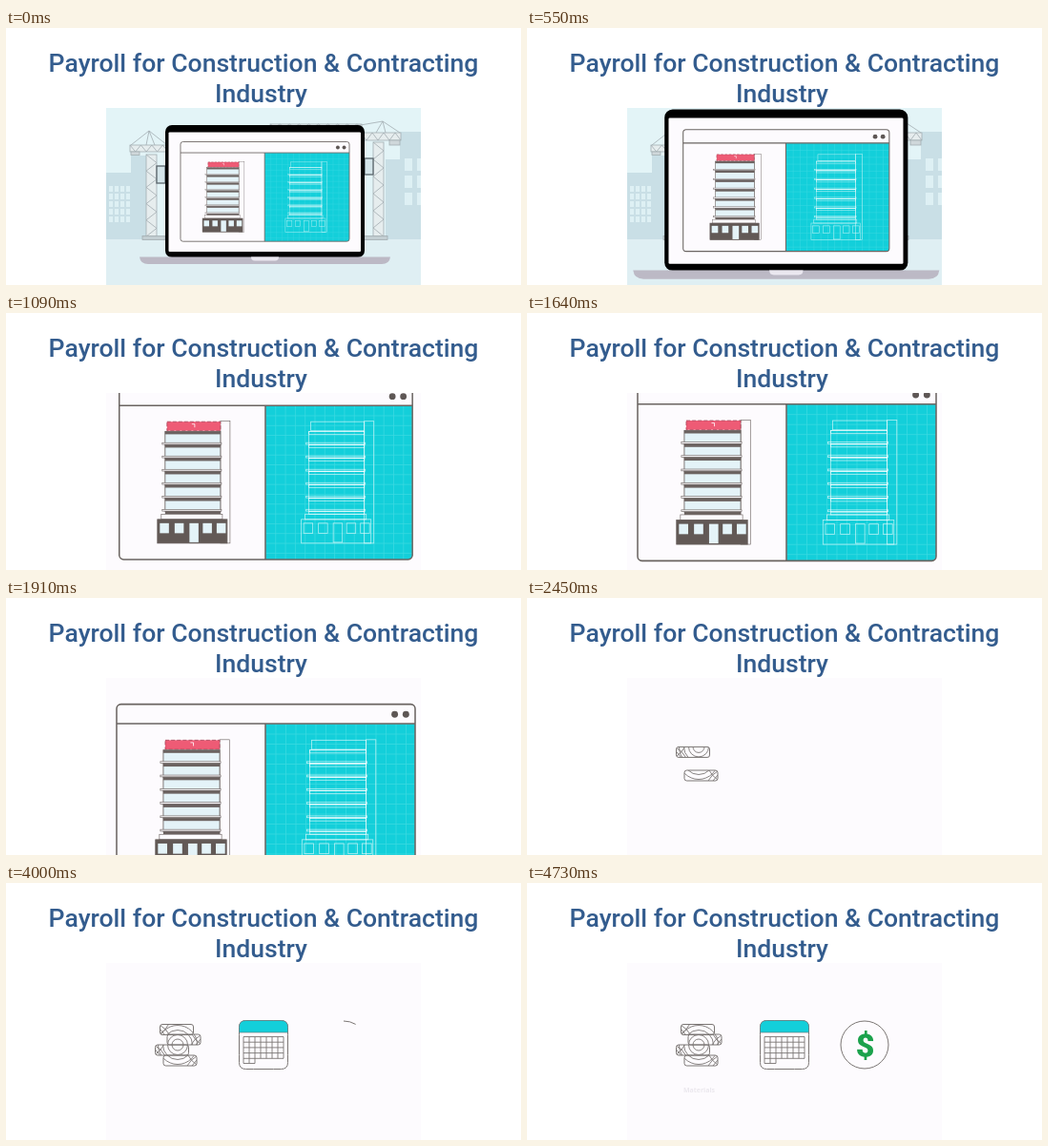
An HTML page that plays this animation: 540 by 270 pixels, repeating every 4.82 s.

```html
<!DOCTYPE html>
<html lang="en">
<head>
<meta charset="utf-8">
<title>Payroll for Construction</title>
<style>
  html, body { margin: 0; width: 100%; height: 100%; overflow: hidden; background: #fff; }
  svg { display: block; width: 540px; height: 270px; }
  .title { font: 500 26.55px Roboto, sans-serif; fill: #335c8e; text-anchor: middle; }
  .label { font: 700 7px "Open Sans", sans-serif; fill: #ebe8ee; text-anchor: middle; }
  .dollar { font: 900 34px Roboto, sans-serif; fill: #1ba24c; text-anchor: middle; }
  .line { fill: none; stroke: #7b7674; stroke-width: 1; }
  .crane { fill: none; stroke: #a2adb1; stroke-width: .8; }
  .solid { stroke: #665d5a; stroke-width: .8; fill: #fdfbfe; }
  .solid .roof { fill: #ee5b75; stroke: #a8475a; stroke-dasharray: 4 2; }
  .solid .glass { fill: #e4f3f8; }
  .solid .slab { fill: #6b6260; stroke: none; }
  .solid .edge { fill: #fdfbfe; stroke-width: .6; }
  .solid .base { fill: #625956; }
  .solid .pane { fill: #e4f3f8; stroke: none; }
  .plan { fill: none; stroke: #fff; stroke-width: .8; stroke-opacity: .66; }
  .plan .mark { display: none; }
</style>
</head>
<body>
<svg viewBox="0 0 540 270">
  <defs>
    <clipPath id="stage"><rect x="105" y="84" width="330" height="186"/></clipPath>
    <clipPath id="frame"><rect x="119" y="77" width="307" height="181.5" rx="4.5"/></clipPath>
    <pattern id="grid" x="272" y="97" width="10.3" height="10.3" patternUnits="userSpaceOnUse">
      <rect width="10.3" height="10.3" fill="#13cfda"/>
      <path d="M0 .4H10.3M.4 0V10.3" stroke="#3ad9e2" stroke-width=".8"/>
    </pattern>
  </defs>
  <text class="title" x="270" y="46">Payroll for Construction &amp; Contracting</text>
  <text class="title" x="267.5" y="78">Industry</text>
  <g clip-path="url(#stage)">
    <rect x="105" y="84" width="330" height="186" fill="#fdfbfe"/>
    <g id="city">
      <rect x="105" y="84" width="330" height="186" fill="#e3f4f7"/>
      <rect x="105" y="222" width="330" height="48" fill="#dfeff3"/>
    </g>
    <g id="laptop">
      <rect x="167" y="102" width="209" height="139" rx="7"/>
      <rect x="170.5" y="109.5" width="201.5" height="125.5" rx="1" fill="#fdfbfe"/>
      <path d="M140 240.5H403Q402 248 394 248H149Q141 248 140 240.5Z" fill="#bcb9c5"/>
      <path d="M257 240.5H286Q286 244.5 282 244.5H261Q257 244.5 257 240.5Z" fill="#ebe8f0"/>
      <g id="win">
        <g clip-path="url(#frame)">
          <rect x="119" y="77" width="307" height="182" fill="#fdfbfe"/>
          <rect x="272" y="97" width="154" height="162" fill="url(#grid)"/>
        </g>
        <g fill="none" stroke="#6a6461" stroke-width="1.5">
          <rect x="119" y="77" width="307" height="181.5" rx="4.5"/>
          <path d="M119 97H426M272 97V258.5"/>
        </g>
        <g fill="#5e5755"><circle cx="405" cy="87.5" r="3.4"/><circle cx="416.5" cy="87.5" r="3.4"/></g>
        <g id="built" class="solid"></g>
        <g id="drawn" class="plan" transform="translate(150.6 0)"></g>
      </g>
    </g>
    <g id="planks"></g>
    <g id="calendar">
      <path id="sheet" class="line"/>
      <path id="head" fill="#13cfda" stroke="#6f7d80" stroke-width=".7"/>
      <path id="cells" class="line" style="stroke-width:.9"/>
    </g>
    <circle id="coin" class="line" cx="354" cy="170" r="25" pathLength="1" stroke-dasharray="1 2" transform="rotate(-90 354 170)"/>
    <text id="dollar" class="dollar" y="12.2">$</text>
    <text id="label" class="label" x="180.5" y="219.5">Materials</text>
  </g>
</svg>
<script>
const LOOP = 4820, TICK = LOOP / 53;
const $ = id => document.getElementById(id);
const add = (el, markup) => el.insertAdjacentHTML('beforeend', markup);
const box = (x, y, w, h, extra = '') => `<rect x="${x}" y="${y}" width="${w}" height="${h}" ${extra}/>`;
const clamp = v => Math.max(0, Math.min(1, v));
const span = (t, a, b) => clamp((t - a) / (b - a));
const easeOut = p => p * (2 - p);
const easeInOut = (p, n) => p < .5 ? 2 ** (n - 1) * p ** n : 1 - 2 ** (n - 1) * (1 - p) ** n;
const show = (el, on) => el.style.display = on ? '' : 'none';

// Zigzag truss between two rails
function truss(x, y, w, h, step, upright) {
  let d = `M${x} ${y}`;
  const n = Math.round((upright ? h : w) / step);
  for (let i = 1; i <= n; i++)
    d += upright ? `L${x + (i % 2) * w} ${y + i * h / n}` : `L${x + i * w / n} ${y + (i % 2) * h}`;
  return box(x, y, w, h, 'fill="#e6edee"') + `<path d="${d}"/>`;
}

function panes(x, y, cols, rows, w, h, gap) {
  let s = '';
  for (let i = 0; i < cols * rows; i++)
    s += box(x + (i % cols) * (w + gap), y + Math.floor(i / cols) * (h + gap), w, h);
  return `<g fill="#def0f4">${s}</g>`;
}

function drawCity() {
  const city = $('city');
  add(city, `<g fill="#c9dfe6">${box(105, 152, 27, 70) + box(131, 134, 24, 88)
    + box(398, 138, 20, 84) + box(413, 109, 22, 113)}</g>`);
  add(city, panes(108, 166, 4, 5, 4, 6, 2) + panes(418, 137, 2, 3, 8, 13, 5));
  add(city, `<g class="crane">
    ${truss(147, 133, 11, 86, 9, true)}${truss(130, 123, 40, 7, 6)}
    <path d="M131 123L150 108L169 123M147 123L150 108L156 123"/>
    ${box(131, 130, 9, 3.5, 'fill="#cfd7da"')}${box(143, 218.5, 24, 4, 'fill="#c3ced2"')}
    ${truss(385, 120, 11, 99, 9, true)}${truss(277, 101, 96, 3, 5)}${truss(372, 110, 42, 8, 6)}
    <path d="M360 104L395 98L413 110M388 110L395 98L398 110"/>
    ${box(402, 118, 11, 5, 'fill="#cfd7da"')}${box(375, 218.5, 25, 4, 'fill="#c3ced2"')}
    <g fill="#d3e4e9" stroke="#59646a" stroke-width="1.3">${box(158, 145, 9, 18)}${box(376, 137, 9, 17)}</g>
  </g>`);
}

function drawTower(el) {
  let s = box(225, 113.5, 10, 128, 'class="edge"') + box(169, 114, 56, 9.5, 'class="roof"');
  for (let i = 0; i < 6; i++) {
    const y = 124.2 + i * 14;
    s += box(167, y, 58, 14, 'class="glass"') + box(167, y, 58, 3, 'class="slab"')
      + box(164, y + 11.8, 62, 1.8, 'class="edge"');
  }
  s += box(167, 208, 58, 3, 'class="slab"') + box(163, 211, 64, 5.5, 'class="edge"')
    + box(159, 216.5, 73, 25, 'class="base"');
  for (const x of [161.5, 177, 206.5, 221]) s += box(x, 220.5, 9.5, 10.5, 'class="pane"');
  s += box(192.5, 220.5, 9.5, 20, 'class="pane"');
  s += '<path class="mark" d="M195 116.5H198V120" fill="none" stroke="#fff"/>';
  add(el, s);
}

// Planks from bottom to top: left edge, top edge, start time, which end is split
const PLANKS = [[165, 181, 2270, 1], [156.5, 170, 2405, 0], [169, 159, 2480, 1], [161.5, 148.5, 2560, 0]];
function drawPlanks() {
  const rings = [6, 10.5, 15.5, 20.5].map(r => `<circle cx="180" cy="170" r="${r}"/>`).join('');
  PLANKS.forEach(([x, y, , right], i) => {
    const e = right ? x + 35 : x, d = right ? -1 : 1;
    add($('planks'), `<g><clipPath id="p${i}">${box(x, y, 35, 11, 'rx="2.5"')}</clipPath>
      ${box(x, y, 35, 11, 'rx="2.5" class="line"')}
      <g class="line" style="stroke-width:.9" clip-path="url(#p${i})">${rings}
      <path d="M${e} ${y + 1}Q${e + d * 6} ${y + 4} ${e + d * 10} ${y + 11}M${e} ${y + 10}Q${e + d * 6} ${y + 6} ${e + d * 9} ${y}M${e} ${y + 5}L${e + d * 5} ${y + 11}"/></g></g>`);
  });
}

// Calendar outline and header: folded pose and settled pose
const BENT = [[231, 165.5], [231, 158.5], [252, 145], [262, 138], [269, 131.5], [277, 141],
  [252, 147], [231, 158.5], [231, 165.5], [247, 184], [251, 199], [242, 185]];
const FLAT = [[244.5, 158.5], [244.5, 144.5], [258.5, 144.5], [281.5, 144.5], [295.5, 144.5], [295.5, 158.5],
  [295.5, 181.5], [295.5, 195.5], [281.5, 195.5], [258.5, 195.5], [244.5, 195.5], [244.5, 181.5]];
const HEAD_BENT = [[270, 153.5], [260.5, 139.5], [264, 135.5], [268, 134.5], [269, 134.5], [275, 135.5], [277, 141], [271, 153.5]];
const HEAD_FLAT = [[244.5, 157], [244.5, 151.5], [244.5, 144.5], [251.5, 144.5], [288.5, 144.5], [295.5, 144.5], [295.5, 151.5], [295.5, 157]];
const mix = (a, b, p) => a.map(([x, y], i) => [x + (b[i][0] - x) * p, y + (b[i][1] - y) * p]);
const small = pts => pts.map(([x, y]) => [219 + (x - 231) * .4, 128 + (y - 132) * .5]);
function pose(bent, flat, t) {
  return t < 3180 ? mix(small(bent), bent, span(t, 3000, 3180))
    : mix(bent, flat, easeOut(span(t, 3182, 3450)));
}
function loopPath(pts) {
  const mid = i => {
    const a = pts[i % pts.length], b = pts[(i + 1) % pts.length];
    return [(a[0] + b[0]) / 2, (a[1] + b[1]) / 2];
  };
  return `M${mid(pts.length - 1)}` + pts.map((p, i) => `Q${p} ${mid(i)}`).join('') + 'Z';
}
const headPath = p => `M${p[0]}L${p[1]}Q${p[2]} ${p[3]}L${p[4]}Q${p[5]} ${p[6]}L${p[7]}Z`;

function drawCells() {
  let d = 'M249 189.5H261';
  for (let i = 0; i < 5; i++) d += `M249 ${161.5 + i * 5.7}H291`;
  for (let i = 0; i < 8; i++) d += `M${249 + i * 6} 161.5V${i < 3 ? 189.5 : 184.3}`;
  $('cells').setAttribute('d', d);
}

function render(t) {
  const zoom = easeInOut(span(t, 0, 1350), 2.6);
  $('laptop').setAttribute('transform',
    `translate(${271.5 + zoom} ${172 - 3.9 * zoom}) scale(${1 + .768 * zoom}) translate(-271.5 -172)`);
  const fall = 200 * span(t, 1635, 2280) ** 2;
  $('win').setAttribute('transform',
    `translate(271.5 ${172 + fall / 1.768}) scale(.5767) translate(-272.5 -168)`);
  show($('win'), t < 2300);

  PLANKS.forEach(([, , start], i) => {
    const g = $('planks').children[i];
    show(g, t >= start);
    g.setAttribute('transform', `translate(0 ${-29 * (1 - easeOut(span(t, start, start + 160)))})`);
  });

  show($('calendar'), t >= 3000);
  $('sheet').setAttribute('d', loopPath(pose(BENT, FLAT, t)));
  $('head').setAttribute('d', headPath(pose(HEAD_BENT, HEAD_FLAT, t)));
  $('cells').style.opacity = span(t, 3270, 3450);

  show($('coin'), t >= 4000);
  $('coin').setAttribute('stroke-dashoffset', 1 - span(t, 3960, 4450));
  show($('dollar'), t >= 4540);
  const pop = t < 4638 ? .5 + .56 * span(t, 4547, 4637) : 1.06 - .06 * span(t, 4638, 4728);
  $('dollar').setAttribute('transform', `translate(354.5 170) scale(${pop})`);
  $('label').style.opacity = span(t, 4600, 4728);
}

drawCity();
drawTower($('built'));
drawTower($('drawn'));
drawPlanks();
drawCells();

const begin = performance.now();
function tick() {
  const t = (performance.now() - begin) % LOOP;
  render(Math.min(52, Math.floor((t + 6) / TICK)) * TICK);
  requestAnimationFrame(tick);
}
tick();
</script>
</body>
</html>
```
